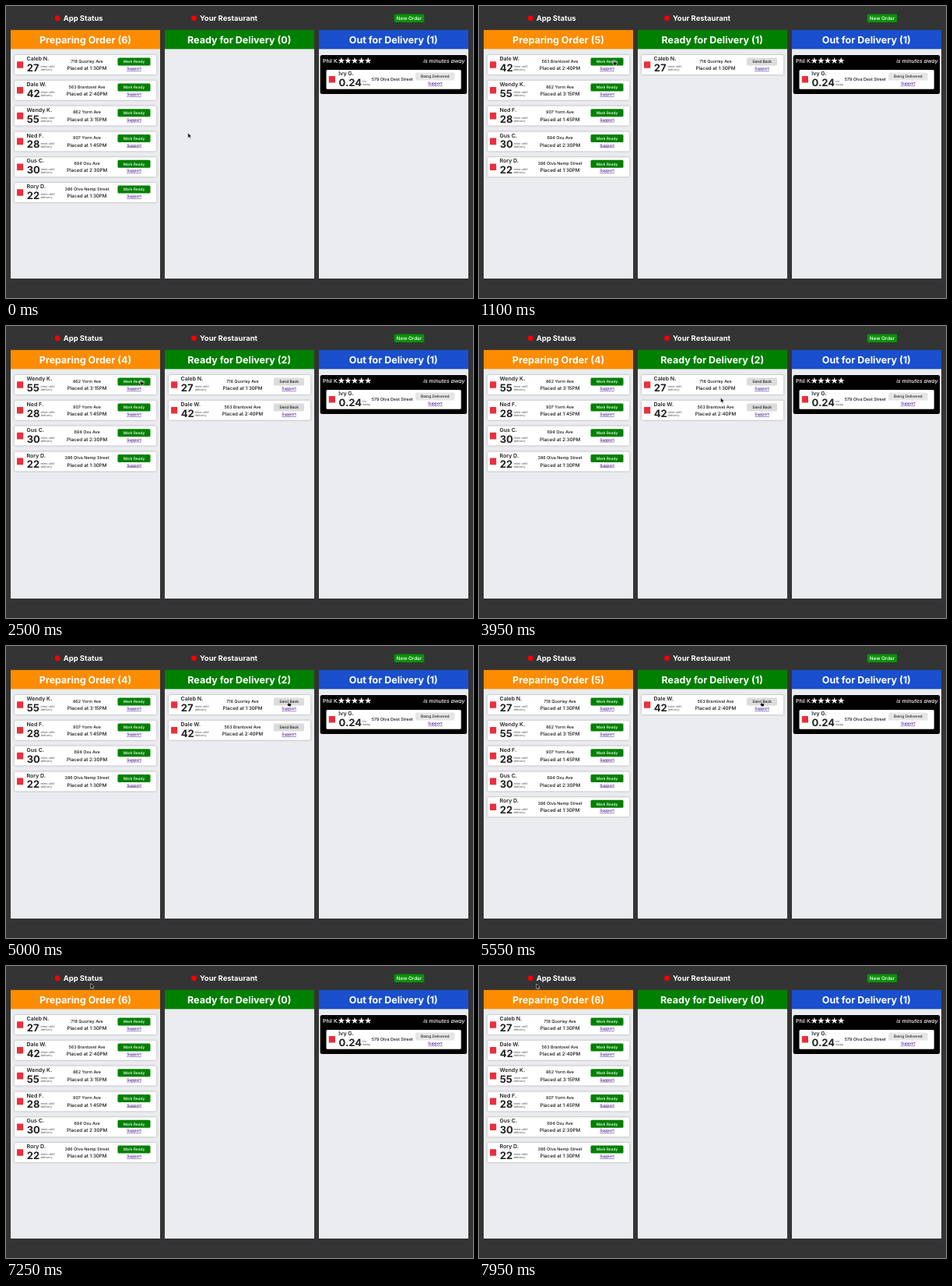
An HTML page that plays this animation: 600x375 px, repeating every 8 s.

```html
<!DOCTYPE html>
<html lang="en">
<head>
<meta charset="utf-8">
<title>Order board</title>
<style>
  html, body { margin: 0; width: 100%; height: 100%; overflow: hidden; background: #343434; }
  svg { display: block; width: 100vw; height: 100vh; }
  text { font-family: Inter, Roboto, sans-serif; text-rendering: geometricPrecision; }
  .card { fill: #fff; filter: drop-shadow(0 .8px .9px rgba(0, 0, 0, .35)); }
</style>
</head>
<body>
<svg viewBox="0 0 600 375">
  <g id="board"></g>
  <g id="cards"></g>
  <g id="cursor" stroke-linejoin="round">
    <path id="arrow" d="M0 0V6.4L1.5 5.1L2.5 7.3L3.6 6.8L2.6 4.7H4.5Z" fill="#000" stroke="#fff" stroke-width=".5"/>
    <path id="hand" d="M.4 .4Q1.1-.3 1.6 .5V2.8L4.3 3.3Q5 3.5 4.9 4.3L4.4 7H1.5L-.7 4.5Q-.6 3.7 .4 4.3Z" fill="#111" stroke="#fff" stroke-width=".6"/>
  </g>
</svg>
<script>
const LOOP = 8000, ROW_PITCH = 32.8;

// ready: interval in which the order sits in the middle column
const orders = [
  { name: 'Caleb N.', mins: 27, address: '718 Quorley Ave', placed: '1:30', ready: [1000, 5050] },
  { name: 'Dale W.', mins: 42, address: '563 Brantovel Ave', placed: '2:40', ready: [2350, 5600] },
  { name: 'Wendy K.', mins: 55, address: '862 Yorm Ave', placed: '3:15' },
  { name: 'Ned F.', mins: 28, address: '907 Yorm Ave', placed: '1:45' },
  { name: 'Gus C.', mins: 30, address: '694 Oxu Ave', placed: '2:30' },
  { name: 'Rory D.', mins: 22, address: '386 Olva Nemp Street', placed: '1:30' },
];

// Cursor moves: start time, end time, destination
const startPoint = [233.8, 163];
const moves = [
  [550, 950, 172.2, 69],
  [2600, 3600, 310.5, 92],
  [4050, 4750, 361.6, 70.7],
  [5700, 6350, 242.5, 20],
  [6650, 7500, 73.8, 23],
];

const byId = id => document.getElementById(id);

function text(x, y, size, content, { weight = 450, fill = '#111', anchor = 'start', extra = '' } = {}) {
  return `<text x="${x}" y="${y}" font-size="${size}" font-weight="${weight}" fill="${fill}" text-anchor="${anchor}" ${extra}>${content}</text>`;
}

function box(x, y, width, height, fill, radius = 0) {
  return `<rect x="${x}" y="${y}" width="${width}" height="${height}" rx="${radius}" fill="${fill}"/>`;
}

function button(center, y, width, label, fill, color) {
  return box(center - width / 2, y, width, 10, fill, 1.5) +
    text(center, y + 6.8, 4.85, label, { fill: color, anchor: 'middle' });
}

const support = (x, y) =>
  text(x, y, 4.9, 'Support', { weight: 500, fill: '#45148a', anchor: 'middle', extra: 'text-decoration="underline"' });

// Parts shared by every card: mark, name, big number and its unit
function summary(x, y, name, number, units, unitX) {
  return box(x + 3, y + 8.2, 8.2, 8.6, '#e9303c', .5) +
    text(x + 15.5, y + 7.2, 7, name, { weight: 600, fill: '#222' }) +
    text(x + 15.7, y + 21, 13, number, { weight: 700, fill: '#222' }) +
    units.map((unit, i) => text(unitX, y + 16.4 + i * 4, 3.9, unit, { fill: '#666' })).join('');
}

function orderCard(order, row, isReady) {
  const x = isReady ? 209 : 11, y = 63 + row * ROW_PITCH;
  const middle = isReady ? 304 : 104, right = isReady ? 363.6 : 164.5;
  return `<rect class="card" x="${x}" y="${y}" width="182.3" height="25" rx="1.5"/>` +
    summary(x, y, order.name, order.mins, ['mins until', 'delivery'], x + 33.5) +
    text(middle, y + 9.8, 5.4, order.address, { anchor: 'middle' }) +
    text(middle, y + 19.2, 6.2, `Placed at ${order.placed}PM`, { weight: 500, anchor: 'middle' }) +
    (isReady ? button(right, y + 3.6, 39, 'Send Back', '#dcdcdc', '#111')
             : button(right, y + 3.6, 42, 'Mark Ready', '#008000', '#fff')) +
    support(right, y + 19.2);
}

function star(cx, cy, radius) {
  const points = Array.from({ length: 10 }, (_, i) => {
    const r = i % 2 ? radius * .39 : radius, angle = i * Math.PI / 5;
    return `${cx + r * Math.sin(angle)},${cy - r * Math.cos(angle)}`;
  });
  return `<polygon points="${points.join(' ')}" fill="#fff"/>`;
}

function statusLight(x, label) {
  return `<circle cx="${x}" cy="15.6" r="3.4" fill="#f00"/>` +
    text(x + 7.5, 19.1, 9.45, label, { weight: 700, fill: '#fff' });
}

function column(x, color) {
  return box(x, 31, 192, 319, '#ebecf0') + box(x, 30.8, 192, 24.5, color);
}

const heading = (x, label) =>
  text(x, 47.7, 12.5, label, { weight: 700, fill: '#fff', anchor: 'middle' });

byId('board').innerHTML =
  statusLight(66.2, 'App Status') + statusLight(241.5, 'Your Restaurant') +
  box(498.7, 10.5, 38.5, 10.5, '#079307', 1.5) +
  text(518, 18, 6.3, 'New Order', { fill: '#fff', anchor: 'middle' }) +
  column(6, '#fc8c00') + column(204, '#008000') + column(402, '#1a4fcd') +
  heading(497.8, 'Out for Delivery (1)') +
  box(403.7, 63, 188.4, 50, '#000', 2.5) +
  text(407, 72.8, 6.9, 'Phil K.', { weight: 500, fill: '#fff' }) +
  [0, 1, 2, 3, 4].map(i => star(430.8 + i * 8.6, 70.3, 4.5)).join('') +
  text(589.5, 72.8, 6.9, 'is minutes away', { weight: 500, fill: '#fff', anchor: 'end', extra: 'font-style="italic"' }) +
  box(411.5, 82, 173.2, 24.8, '#fff', 1.5) +
  summary(411.8, 81.8, 'Ivy G.', '0.24', ['mi', 'away'], 458.3) +
  text(496.2, 96.2, 5.4, '579 Olva Dest Street', { anchor: 'middle' }) +
  button(551.3, 85.5, 50.5, 'Being Delivered', '#e6e6e6', '#222') +
  support(551.3, 101.1);

function cursorAt(time) {
  let [x, y] = startPoint;
  for (const [start, end, toX, toY] of moves) {
    const p = Math.min(1, Math.max(0, (time - start) / (end - start)));
    const eased = p * p * (3 - 2 * p);
    x += (toX - x) * eased;
    y += (toY - y) * eased;
  }
  return [x, y];
}

let shownState;
function draw() {
  const time = performance.now() % LOOP;
  const isReady = ({ ready }) => Boolean(ready) && time >= ready[0] && time < ready[1];
  const ready = orders.filter(isReady), preparing = orders.filter(order => !isReady(order));

  const state = orders.map(isReady).join();
  if (state !== shownState) {
    shownState = state;
    byId('cards').innerHTML =
      heading(102, `Preparing Order (${preparing.length})`) +
      heading(299.7, `Ready for Delivery (${ready.length})`) +
      preparing.map((order, row) => orderCard(order, row, false)).join('') +
      ready.map((order, row) => orderCard(order, row, true)).join('');
  }

  const [x, y] = cursorAt(time);
  const overButton = y > 66.5 && y < 76.7 &&
    ((x > 143.5 && x < 185.5) || (ready.length > 0 && x > 344 && x < 383));
  byId('cursor').setAttribute('transform', `translate(${x} ${y})`);
  byId('hand').style.display = overButton ? '' : 'none';
  byId('arrow').style.display = overButton ? 'none' : '';
  requestAnimationFrame(draw);
}
draw();
</script>
</body>
</html>
```
